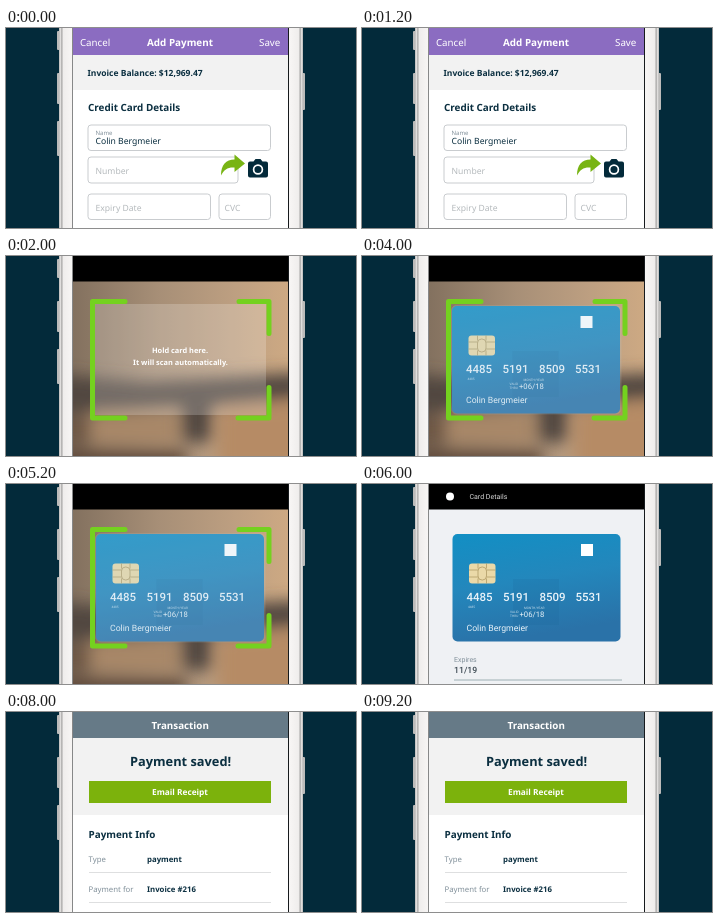
An HTML page for the animation above (10 s loop, 350 px wide and 200 px high).

```html
<!DOCTYPE html>
<html lang="en">
<head>
<meta charset="utf-8">
<title>Mobile payment</title>
<style>
  html, body { margin: 0; width: 100%; height: 100%; overflow: hidden; background: #032a3a; }
  svg { display: block; width: 350px; height: 200px; }
  text { font-family: "Noto Sans", "Open Sans", sans-serif; text-rendering: geometricPrecision; fill: #0b2f40; }
  .b { font-weight: 700; }
  .w { fill: #fff; }
  .hint { fill: #b5babd; }
  .label { fill: #81909a; }
  .card text, .plain { font-family: Roboto, Inter, sans-serif; }
  .card text { fill: #e9f3f9; }
  .field { fill: #fff; stroke: #c9cccf; }
  .scene { visibility: hidden; }
  .scene.on { visibility: visible; }
</style>
</head>
<body>
<svg viewBox="0 0 350 200">
  <defs>
    <clipPath id="screen"><rect x="67" width="215" height="200"/></clipPath>
    <clipPath id="view"><rect x="67" y="25.500" width="215" height="175"/></clipPath>
    <filter id="soft" x="-50%" y="-50%" width="200%" height="200%"><feGaussianBlur stdDeviation="8"/></filter>
    <linearGradient id="side">
      <stop offset="0" stop-color="#b9b8b7"/><stop offset=".12" stop-color="#e4e2e1"/>
      <stop offset=".2" stop-color="#a5a4a3"/><stop offset=".3" stop-color="#efedec"/>
      <stop offset="1" stop-color="#f8f6f5"/>
    </linearGradient>
    <linearGradient id="blue" x1="0" y1="0" x2=".25" y2="1">
      <stop offset="0" stop-color="#128fc4"/><stop offset=".5" stop-color="#2387bc"/><stop offset="1" stop-color="#2a72a8"/>
    </linearGradient>
    <linearGradient id="wall">
      <stop offset="0" stop-color="#83715f"/><stop offset=".4" stop-color="#a78f77"/>
      <stop offset=".75" stop-color="#bd9f81"/><stop offset="1" stop-color="#cda983"/>
    </linearGradient>
    <g id="photo" clip-path="url(#view)">
      <rect x="67" y="25" width="215" height="175" fill="url(#wall)"/>
      <g filter="url(#soft)">
        <path d="M50 118L140 126L300 116V142L205 150V186H176V150L50 158Z" fill="#51463f"/>
        <rect x="85" y="156" width="88" height="32" fill="#a88768"/>
        <path d="M212 152L300 144V215H212Z" fill="#b68b65"/>
        <rect x="50" y="160" width="34" height="28" fill="#6d5645"/>
        <rect x="50" y="194" width="130" height="22" fill="#5e4a3b"/>
      </g>
    </g>
    <path id="frame" d="M119 45.500H86.500V162H119M233 45.500H263V77.500M263 131.500V162H232"
      fill="none" stroke="#74d11f" stroke-width="5" stroke-linecap="round" stroke-linejoin="round"/>
    <g id="card" class="card">
      <rect x="90.500" y="50" width="168" height="107.500" rx="5" fill="url(#blue)"/>
      <rect x="151" y="95" width="46" height="46" fill="#185f90" opacity=".14"/>
      <rect x="219" y="60" width="12" height="12" fill="#fff"/>
      <rect x="107" y="79.500" width="26.500" height="20" rx="3" fill="#ead9a8"/>
      <path d="M107 86h9M107 93h9M124.500 86h9M124.500 93h9M116 79.500v5M124.500 79.500v5M116 94.500v5M124.500 94.500v5"
        stroke="#a8935c" stroke-width=".7"/>
      <rect x="116" y="83" width="8.500" height="13" rx="4" fill="none" stroke="#a8935c" stroke-width=".7"/>
      <g font-size="11.500" font-weight="500">
        <text x="104.500" y="117">4485</text><text x="141" y="117">5191</text>
        <text x="177.500" y="117">8509</text><text x="213.500" y="117">5531</text>
      </g>
      <g font-size="3.200" opacity=".8">
        <text x="106" y="123.500">4485</text><text x="162" y="125">MONTH/YEAR</text>
        <text x="148" y="129">VALID</text><text x="148" y="132.500">THRU</text>
      </g>
      <text x="157.500" y="133" font-size="7.700">+06/18</text>
      <text x="104.500" y="147" font-size="8.700">Colin Bergmeier</text>
    </g>
  </defs>

  <rect width="350" height="200" fill="#032a3a"/>
  <g fill="#bcbbba">
    <rect x="51" y="3" width="4" height="19" rx="1"/>
    <rect x="51" y="45" width="4" height="31" rx="1"/>
    <rect x="51" y="93" width="4" height="35" rx="1"/>
    <rect x="296" y="45" width="3" height="37" rx="1"/>
  </g>
  <rect x="53" width="14" height="200" fill="url(#side)"/>
  <rect x="53" width="14" height="200" fill="url(#side)" transform="translate(350) scale(-1 1)"/>
  <rect x="66.500" width="216.500" height="200" fill="#161a1d"/>

  <g clip-path="url(#screen)">
    <g class="scene on">
      <rect x="67" width="215" height="200" fill="#fff"/>
      <rect x="67" width="215" height="27" fill="#8b6cc1"/>
      <rect x="67" y="27" width="215" height="35" fill="#f2f2f2"/>
      <text class="w" x="74" y="17.500" font-size="9.700">Cancel</text>
      <text class="w b" x="141" y="17.500" font-size="9.900">Add Payment</text>
      <text class="w" x="253" y="17.500" font-size="9.800">Save</text>
      <text class="b" x="81.500" y="47.500" font-size="8.500">Invoice Balance: $12,969.47</text>
      <text class="b" x="82" y="83" font-size="9.900">Credit Card Details</text>
      <g class="field">
        <rect x="82" y="97" width="182.500" height="25.500" rx="3"/>
        <rect x="82" y="129" width="150" height="26" rx="3"/>
        <rect x="82" y="166" width="122.500" height="25.500" rx="3"/>
        <rect x="213" y="166" width="51.500" height="25.500" rx="3"/>
      </g>
      <text class="label" x="89.500" y="106.500" font-size="6">Name</text>
      <text x="89.500" y="116" font-size="8.600">Colin Bergmeier</text>
      <g font-size="8.600">
        <text class="hint" x="89.500" y="146">Number</text>
        <text class="hint" x="89.500" y="182.500">Expiry Date</text>
        <text class="hint" x="218.500" y="182.500">CVC</text>
      </g>
      <path d="M215 147.500C215 137 220 131.500 228.500 131.500V126.500L239 135.500L228.500 144V139.500C222 139 218 141.500 215 147.500Z" fill="#78b414"/>
      <path d="M244 133.500h3.500l2-2.500h5l2 2.500h3.500q2 0 2 2v12q0 2-2 2h-16q-2 0-2-2v-12q0-2 2-2Z" fill="#032a3a"/>
      <circle cx="252" cy="141.500" r="4.400" fill="none" stroke="#fff" stroke-width="1.700"/>
    </g>

    <g class="scene">
      <rect x="67" width="215" height="200" fill="#000"/>
      <use href="#photo"/>
      <rect x="89" y="48" width="171" height="111" fill="#fff" opacity=".2"/>
      <use href="#frame"/>
      <g class="b" font-size="7.400" text-anchor="middle">
        <text class="w" x="174" y="97">Hold card here.</text>
        <text class="w" x="174.500" y="108.500">It will scan automatically.</text>
      </g>
    </g>

    <g class="scene">
      <rect x="67" width="215" height="200" fill="#000"/>
      <use href="#photo"/>
      <use href="#frame"/>
      <use href="#card" x="-.5"/>
      <rect x="89.500" y="49.500" width="169.500" height="108.500" rx="5" fill="#b4d0e2" stroke="#b5c3c8" opacity=".2"/>
    </g>

    <g class="scene">
      <rect x="67" width="215" height="200" fill="#eff1f4"/>
      <rect x="67" width="215" height="25.500" fill="#000"/>
      <circle cx="88" cy="12.500" r="4" fill="#fff"/>
      <text class="plain" x="107.500" y="15.300" font-size="7" style="fill:#d9d9d9">Card Details</text>
      <use href="#card"/>
      <text class="plain label" x="92" y="177.500" font-size="7">Expires</text>
      <text class="plain" x="92" y="189" font-size="8.700" font-weight="500" style="fill:#3d4a53">11/19</text>
      <path d="M92 196H260" stroke="#93a7ad" stroke-width=".9"/>
    </g>

    <g class="scene">
      <rect x="67" width="215" height="200" fill="#fff"/>
      <rect x="67" width="215" height="26" fill="#667a87"/>
      <rect x="67" y="26" width="215" height="77" fill="#f2f2f2"/>
      <text class="w b" x="145.500" y="17" font-size="9.800">Transaction</text>
      <text class="b" x="124" y="53.500" font-size="12.800">Payment saved!</text>
      <rect x="83" y="69" width="182" height="22" fill="#7cb20c"/>
      <text class="w b" x="146" y="83" font-size="8.300">Email Receipt</text>
      <text class="b" x="82.500" y="126" font-size="9.900">Payment Info</text>
      <g font-size="7.800">
        <text class="label" x="82.500" y="150">Type</text>
        <text class="b" x="141" y="150">payment</text>
        <text class="label" x="82.500" y="179.500">Payment for</text>
        <text class="b" x="141" y="179.500">Invoice #216</text>
      </g>
      <path d="M83 160.500H265M83 190.500H265" stroke="#dedfe0"/>
    </g>
  </g>
</svg>
<script>
  const HOLD = 2000;
  const scenes = [...document.querySelectorAll(".scene")];
  const start = performance.now();

  function draw() {
    const t = Math.max(0, performance.now() - start);
    const current = Math.floor(t / HOLD) % scenes.length;
    scenes.forEach((scene, i) => scene.classList.toggle("on", i === current));
    requestAnimationFrame(draw);
  }
  draw();
</script>
</body>
</html>
```
